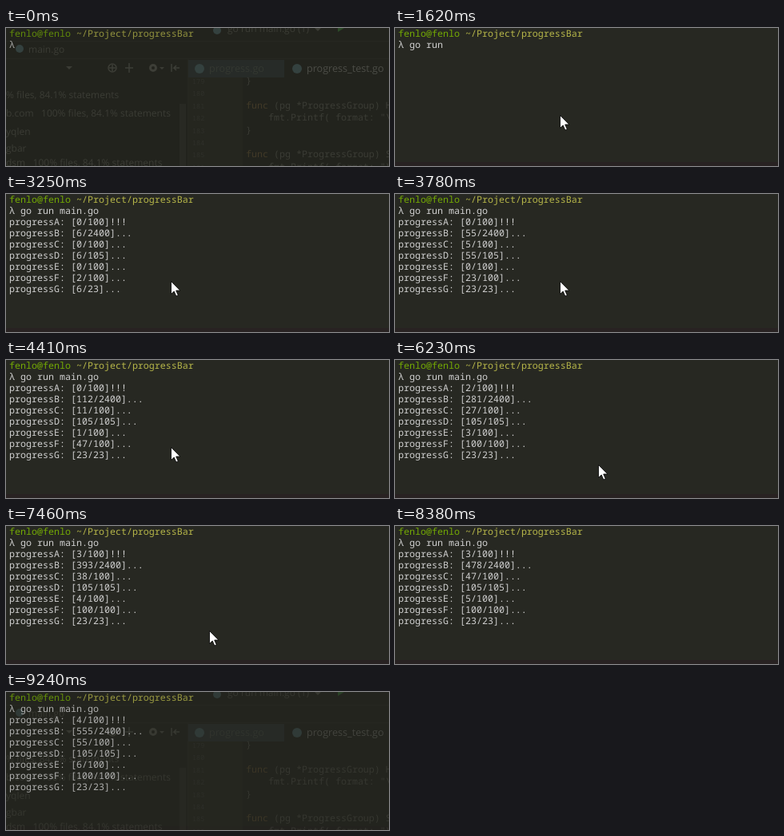
Recreate the animation shown at these times as an HTML page. Size 479x173 px, loop 9330 ms.

```html
<!DOCTYPE html>
<html lang="en">
<head>
<meta charset="utf-8">
<title>Progress bars in a terminal</title>
<style>
html, body { margin: 0; width: 100%; height: 100%; overflow: hidden; background: #272822; }
svg { display: block; }
text { white-space: pre; text-rendering: geometricPrecision; }
.mono { font: 11.667px "Noto Sans Mono", monospace; }
#term { fill: #d0d0d0; font-weight: 500; }
#ghost { font: 12px "Open Sans", sans-serif; fill: #3b3c35; }
#ghost .tab { font-size: 12.6px; }
#ghost .num { font-size: 8.5px; fill: #2f302a; }
#ghost .key { fill: #423a28; }
</style>
</head>
<body>
<svg width="479" height="173" viewBox="0 0 479 173">
  <rect width="479" height="173" fill="#272822"/>
  <rect y="168" width="479" height="5" fill="#282222"/>

  <!-- editor window showing through the terminal -->
  <g id="ghost">
    <rect width="479" height="173" fill="#22231d"/>
    <rect x="228" y="40" width="120" height="22" fill="#272b28"/>
    <rect x="228" y="62" width="68" height="111" fill="#25261f"/>
    <rect x="217" y="95" width="8" height="78" fill="#282923"/>
    <path d="M0 16.5H479M0 38.5H479M227.5 39V173" stroke="#262721"/>
    <g fill="#34413f">
      <circle cx="264" cy="3" r="5"/><circle cx="17" cy="26" r="5"/>
      <circle cx="242" cy="51" r="6"/><circle cx="364" cy="51" r="6"/>
    </g>
    <text x="277" y="5">go run main.go (1)</text>
    <path d="M386 0H394L390 4ZM75 48H83L79 52ZM192 49H198L195 52Z"/>
    <path d="M415 -5L423 0 415 5Z" fill="#2c4a28"/>
    <text x="28" y="31">main.go</text>
    <g fill="none" stroke="#3d3e37" stroke-width="1.5">
      <circle cx="133" cy="50" r="5"/>
      <path d="M133 46V54M129 50H137M149 50H159M154 44V56M207 45V55M217 50H210L213 47M210 50L213 53"/>
      <circle cx="184" cy="50" r="3.5" stroke-width="3"/>
    </g>
    <text x="254" y="55" class="tab" fill="#343831">progress.go</text>
    <text x="376" y="55" class="tab" fill="#4c4d47">progress_test.go</text>
    <text y="88">% files, 84.1% statements</text>
    <text y="111">b.com   100% files, 84.1% statements</text>
    <text y="134">yqlen</text>
    <text y="155">gbar</text>
    <text y="173">dsm   100% files, 84.1% statements</text>
    <g id="code" class="mono"></g>
  </g>

  <g id="term" class="mono">
    <text x="4" y="11" fill="#74aa04">fenlo@fenlo <tspan fill="#b6b649">~/Project/progressBar</tspan></text>
  </g>
  <path id="mouse" d="M.5 .5V16.5L4.2 13 6.8 19 9.3 18 6.7 12H11.8Z" fill="#fff" stroke="#000" stroke-width=".8"/>
</svg>
<script>
const LOOP = 9330, START = 3250, STEP = 76.8, KEY = 70;
const $ = id => document.getElementById(id);

function addText(parent, x, y, str = '', cls = '') {
  const el = document.createElementNS('http://www.w3.org/2000/svg', 'text');
  el.setAttribute('x', x);
  el.setAttribute('y', y);
  el.setAttribute('class', cls);
  el.textContent = str;
  parent.append(el);
  return el;
}

['}', '', 'func (pg *ProgressGroup) H', '    fmt.Printf( format: "\\0', '}', '',
 'func (pg *ProgressGroup) S', '    fmt.Printf( format: "\\0'].forEach((line, i) => {
  const y = 70 + i * 15.4;
  addText($('code'), 233, y, 179 + i, 'num');
  addText($('code'), 300, y, line.replace('func', '    '));
  if (line.startsWith('func')) addText($('code'), 300, y, 'func', 'key');
});
const rows = Array.from({ length: 8 }, (_, i) => addText($('term'), 4, 25 + 14 * i));

// bursts of typing: start time and keys
const bursts = [[980, 'go'], [1310, ' run'], [1780, ' main'], [2170, '.'], [2320, 'go']];
const typed = t => bursts.map(([start, keys]) =>
  keys.slice(0, Math.max(0, Math.floor((t - start) / KEY) + 1))).join('');

// every bar advances at its own rate until it reaches its maximum
const bars = [[1 / 128, 100], [1, 2400], [1 / 10.08, 100], [1, 105],
  [1 / 86, 100], [.42, 100], [1, 23]];
function progress(tick) {
  const n = Math.round(6 + 7.04 * tick);
  return bars.map(([rate, max], i) =>
    `progress${'ABCDEFG'[i]}: [${Math.min(Math.floor(n * rate), max)}/${max}]${i ? '...' : '!!!'}`);
}

// the editor fades out at the start and back in at the end, in quarters
const fade = t => Math.max(0, 1 - Math.floor(t / 72) / 4, Math.floor((t - 9015) / 75) / 4);

function ease(t, from, to) {
  const p = Math.min(1, Math.max(0, (t - from) / (to - from)));
  return p * p * (3 - 2 * p);
}

function draw(now) {
  const t = now % LOOP;
  const tick = Math.floor((t - START) / STEP + .25);
  const lines = ['λ ' + typed(t), ...(t < START ? [] : progress(tick))];
  rows.forEach((row, i) => { row.textContent = lines[i] || ''; });

  const f = fade(t);
  $('ghost').setAttribute('opacity', f);
  $('term').setAttribute('opacity', 1 - .25 * f);

  const time = START + tick * STEP;
  const a = ease(time, 4930, 5240), b = ease(time, 7870, 8390);
  $('mouse').setAttribute('transform',
    `translate(${206 + 48 * a + 136 * b} ${109 + 22 * a + 49 * b})`);
  $('mouse').setAttribute('visibility', t < 215 ? 'hidden' : 'visible');
  requestAnimationFrame(draw);
}
draw(0);
</script>
</body>
</html>
```
